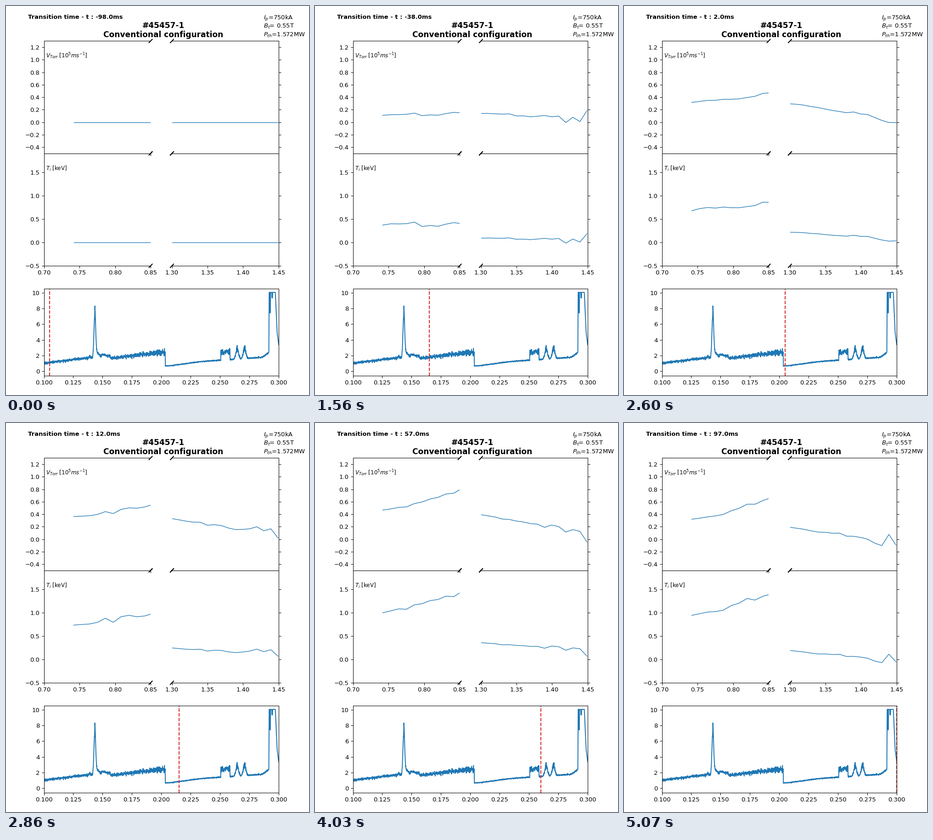
Animation, 660 px wide and 849 px high, one loop 5200 ms. Source, as a matplotlib script:

```python
import numpy as np
import matplotlib.pyplot as plt
from matplotlib.animation import FuncAnimation

W, H, DPI = 660, 849, 96
K = 94.3 / DPI          # point scale for text and strokes
FRAMES, STEP = 40, 130
FIRST = 11              # first frame with measured profiles
BLUE = "tab:blue"

plt.rcParams.update({
    "font.family": "DejaVu Sans",
    "font.size": 10 * K,
    "lines.linewidth": 1.5 * K,
    "axes.linewidth": 0.8 * K,
})
for axis in ("xtick", "ytick"):
    plt.rcParams.update({f"{axis}.major.size": 3.5 * K,
                         f"{axis}.major.width": 0.8 * K,
                         f"{axis}.major.pad": 3.5 * K})

R_IN = .742 + .0111 * np.arange(11)
R_OUT = np.linspace(1.3, 1.449, 16)

# Profile levels over time: inner and outer end of each segment at KEYS
KEYS = [12, 22, 32, 39]
V_IN = [.11, .37, .48, .32], [.15, .55, .82, .66]
V_OUT = [.14, .335, .40, .19], [.06, .05, .08, -.06]
T_IN = [.37, .76, 1.03, .94], [.40, .97, 1.46, 1.39]
T_OUT = [.09, .25, .37, .19], [.06, .10, .20, -.02]


def profile(r, ends, bend, rough, i):
    """Bent ramp between the two end levels, with scatter along it."""
    if i < FIRST:
        return np.zeros(r.size)
    a, b = (np.interp(i, KEYS, e) for e in ends)
    u = np.linspace(0, 1, r.size)
    scatter = np.random.default_rng(i).normal(0, 1, r.size)
    return a + (b - a) * u ** bend + scatter * np.interp(u, [0, .6, 1], rough)


def bump(t, centre, width, height):
    return height * np.exp(-((t - centre) / width) ** 2 / 2)


def between(t, start, stop):
    return (t > start) & (t < stop)


def trace():
    """Signal over 100 to 300 ms: slow ramps, one crash, several bursts."""
    t = np.linspace(100, 300, 2001)
    ramp = [(100, 1.03), (136, 1.68), (157, 1.65), (180, 2.1), (203.3, 2.45),
            (203.5, .7), (208, .72), (234, 1.25), (262, 1.53), (286, 1.8),
            (291.6, 2.4), (291.9, 10.03), (297.1, 10.03), (298.7, 4.9), (300, 3.4)]
    noise = [(100, .18), (157, .2), (203.3, .44), (203.5, .05), (250, .1),
             (291, .13), (291.7, 0)]
    bursts = (between(t, 250.7, 258.6) + bump(t, 264.7, 1.1, 1.3)
              + bump(t, 271, 1.1, 1.25))
    y = np.interp(t, *zip(*ramp)) + bursts
    y += bump(t, 139, .9, .25) + bump(t, 143.3, .7, 5.2)
    y += (t > 143.3) * 1.6 * np.exp(-np.abs(t - 143.3) / 3)
    y += .3 * between(t, 149, 156.7)
    y -= 2.6 * between(t, 292.5, 293) + .7 * between(t, 294.2, 294.8)
    rng = np.random.default_rng(4)
    amp = np.interp(t, *zip(*noise)) + .35 * bursts
    y += rng.normal(0, .42, t.size) * amp
    return t / 1000, np.minimum(y, 10.03)


fig = plt.figure(figsize=(W / DPI, H / DPI), dpi=DPI, facecolor="white")


def panel(x0, x1, top, bottom, xlim, ylim):
    ax = fig.add_axes([x0 / W, 1 - bottom / H, (x1 - x0) / W, (bottom - top) / H])
    ax.set(xlim=xlim, ylim=ylim)
    return ax


def label(x, y, text, **kw):
    return fig.text(x / W, 1 - y / H, text, va="baseline", **kw)


def broken_pair(top, bottom, ylim, yticks, name):
    left = panel(82.5, 315, top, bottom, (.7, .85), ylim)
    right = panel(361.5, 594, top, bottom, (1.3, 1.45), ylim)
    left.set_xticks([.7, .75, .8, .85])
    right.set_xticks([1.3, 1.35, 1.4, 1.45])
    d = .015
    for ax, edge, side in ((left, 1, "right"), (right, 0, "left")):
        ax.set_yticks(yticks)
        ax.spines[side].set_visible(False)
        for y in (0, 1):
            ax.plot([edge - d, edge + d], [y - d, y + d], color="black",
                    transform=ax.transAxes, clip_on=False, zorder=3)
    right.tick_params(axis="y", left=False, labelleft=False, right=True)
    left.text(.02, .85, name, transform=left.transAxes, fontsize=9 * K)
    return left, right


v_axes = broken_pair(76.4, 321.7, (-.5, 1.3), np.arange(-2, 7) * .2,
                     r"$V_{Torr}$ [$10^5ms^{-1}$]")
t_axes = broken_pair(321.7, 567, (-.5, 1.9), np.arange(-1, 4) * .5,
                     r"$T_i$ [keV]")
for ax in v_axes:
    ax.tick_params(axis="x", labelbottom=False)

# axes, radii, end levels, bend, scatter at start / middle / end
SPECS = [
    (v_axes[0], R_IN, V_IN, 1.4, (.005, .02, .01)),
    (v_axes[1], R_OUT, V_OUT, 1, (.004, .015, .07)),
    (t_axes[0], R_IN, T_IN, 1.2, (.02, .04, .02)),
    (t_axes[1], R_OUT, T_OUT, .9, (.004, .015, .07)),
]
curves = [(ax.plot(r, 0 * r, color=BLUE, lw=K)[0], (r, *rule))
          for ax, r, *rule in SPECS]

signal = panel(82.5, 594, 616.6, 806.55, (.1, .3), (-.53, 10.52))
signal.set_xticks(np.linspace(.1, .3, 9))
signal.set_yticks(range(0, 11, 2))
signal.plot(*trace(), color=BLUE)
cursor = signal.axvline(.105, color="tab:red", ls="--")

clock = label(48, 28, "", weight="bold")
for y, line in ((47.5, "#45457-1"), (67.5, "Conventional configuration")):
    label(343, y, line, ha="center", weight="bold", fontsize=13 * K)
for y, line in ((29.5, "$I_p$=750kA"), (48.3, "$B_t$= 0.55T"),
                (67, "$P_{th}$=1.572MW")):
    label(561, y, line)


def update(i):
    clock.set_text(f"Transition time - t : {-98 + 5 * i:.1f}ms")
    x = .105 + .005 * i
    cursor.set_xdata([x, x])
    for line, rule in curves:
        line.set_ydata(profile(*rule, i))
    return [clock, cursor] + [line for line, _ in curves]


anim = FuncAnimation(fig, update, frames=FRAMES, interval=STEP,
                     repeat=True, repeat_delay=0, blit=False)
plt.show()
```
